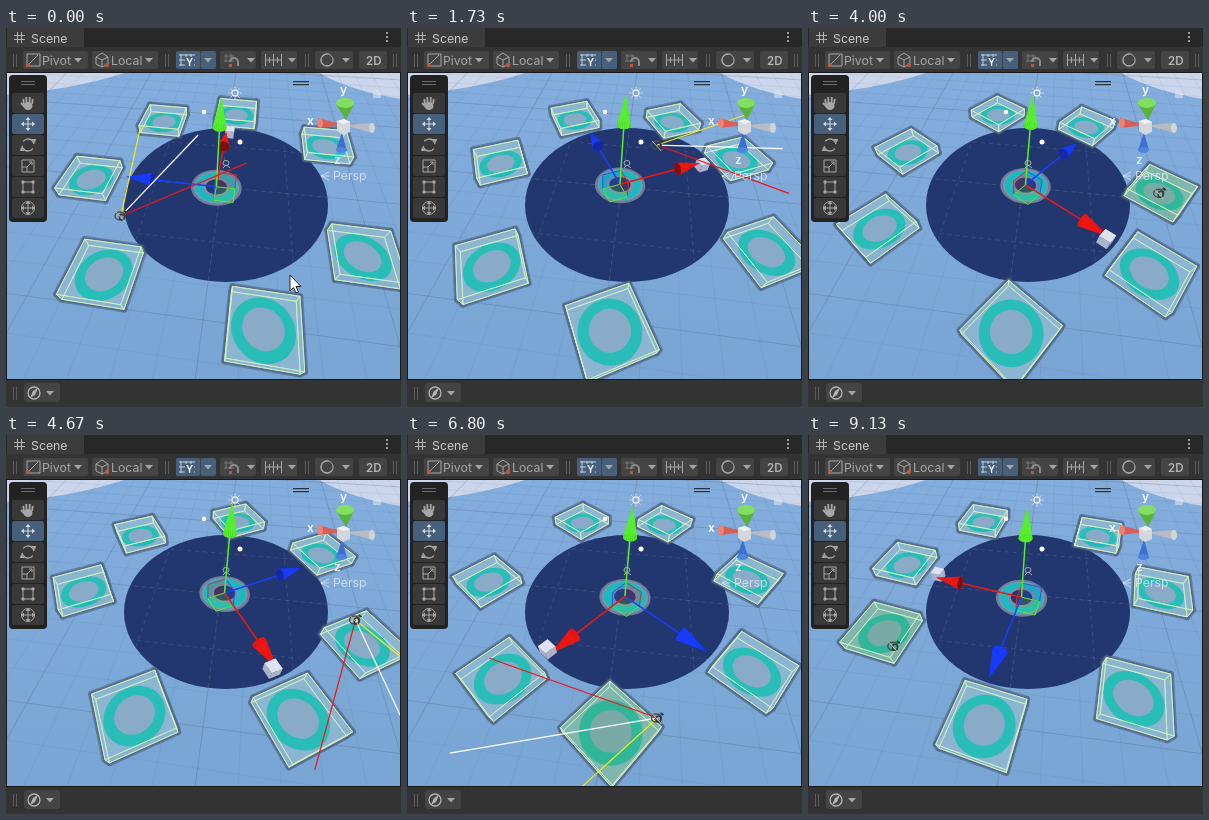
Write an HTML page with a canvas that moves like this. It is 395x379 px and loops after 9190 ms.

```html
<!DOCTYPE html>
<html lang="en">
<head>
<meta charset="utf-8">
<title>Scene view</title>
<style>
html, body { margin: 0; width: 100%; height: 100%; overflow: hidden; background: #282828; }
canvas { display: block; width: 395px; height: 379px; }
</style>
</head>
<body>
<canvas id="view" width="395" height="379"></canvas>
<script>
const g = document.getElementById('view').getContext('2d');
const LOOP = 9190, RAD = Math.PI / 180, TAU = Math.PI * 2;
const INK = '#a6a6a6';

// time, board heading, walker angle on the board, walker radius, facing on the board
const KEYS = [
  [0, 171, 30.7, .378, -110],
  [1730, 110.5, -53, .307, -113],
  [4000, 47.5, -51, .509, -113],
  [5600, -8.5, -23, .449, -113.5],
  [6800, -44.5, -36, .478, -126],
  [7930, -97, -35, .457, -121],
  [9130, -108, -43, .489, -121]
];
// angle and distance from the hub
const TILES = [[4, .503], [-51, .507], [-92, .508], [-143, .526], [-206, .523], [-251, .525], [-306, .509]];

function pose(t) {
  let i = 0;
  while (i < KEYS.length - 2 && t > KEYS[i + 1][0]) i++;
  const a = KEYS[i], b = KEYS[i + 1];
  const u = Math.min(1, (t - a[0]) / (b[0] - a[0]));
  const [, heading, angle, radius, facing] = a.map((v, n) => v + (b[n] - v) * u);
  return { heading, angle, radius, facing };
}

// World: x right, y up, z away from the viewer
const toCamera = ([x, y, z]) => [x + .065, .145 + .8 * z + .6 * y, 1 + .6 * z - .8 * y];
function project(point) {
  const [x, y, depth] = toCamera(point);
  return [197.5 + 264 * x / depth, 197.5 - 264 * y / depth];
}
const polar = (r, deg, y = 0) => [r * Math.cos(deg * RAD), y, r * Math.sin(deg * RAD)];
const add = (a, b, k = 1) => a.map((v, i) => v + b[i] * k);

function trace(points, closed = true) {
  g.beginPath();
  points.forEach(([x, y], i) => i ? g.lineTo(x, y) : g.moveTo(x, y));
  if (closed) g.closePath();
}
function fill(points, color) { trace(points); g.fillStyle = color; g.fill(); }
function line(points, color, width = 1, closed = false) {
  trace(points, closed);
  g.strokeStyle = color; g.lineWidth = width; g.stroke();
}
function rect(x, y, w, h, color, r = 0) {
  g.beginPath(); g.roundRect(x, y, w, h, r); g.fillStyle = color; g.fill();
}
function oval(x, y, rx, ry, color, width) {
  g.beginPath(); g.ellipse(x, y, rx, ry, 0, 0, TAU);
  if (width) { g.strokeStyle = color; g.lineWidth = width; g.stroke(); }
  else { g.fillStyle = color; g.fill(); }
}
function text(s, x, y, size = 12.3, color = INK, weight = 400) {
  g.font = `${weight} ${size}px Inter, Roboto, sans-serif`;
  g.fillStyle = color; g.fillText(s, x, y);
}
function circle(center, r) {
  return Array.from({ length: 40 }, (_, i) => project(add(center, polar(r, i * 9))));
}

function drawGround() {
  const sky = g.createLinearGradient(0, 45, 0, 350);
  sky.addColorStop(0, '#83addd');
  sky.addColorStop(1, '#78a5d3');
  g.fillStyle = sky; g.fillRect(0, 44, 395, 308);
  g.fillStyle = '#cbd6ec';
  g.beginPath(); g.moveTo(0, 45); g.lineTo(118, 45); g.quadraticCurveTo(70, 61, 0, 67); g.fill();
  g.beginPath(); g.moveTo(313, 45); g.lineTo(395, 45); g.lineTo(395, 71); g.quadraticCurveTo(345, 63, 313, 45); g.fill();
  oval(220, 177, 102, 77, '#22376f');
  for (let i = -12; i <= 12; i++) {
    const color = i % 5 ? 'rgba(50,75,120,.08)' : 'rgba(75,80,100,.24)';
    for (const turn of [-7.6, 82.4]) {
      const side = polar(i * .1, turn + 90);
      line([-1.2, 1.2].map(k => project(add(side, polar(1, turn), k))), color);
    }
  }
  g.save();
  g.beginPath(); g.ellipse(220, 177, 102, 77, 0, 0, TAU); g.clip();
  g.setLineDash([4, 4]);
  for (const k of [-.25, 0, .25])
    for (const turn of [-7.6, 82.4])
      line([-.5, .5].map(n => project(add(polar(k, turn + 90), polar(1, turn), n))), 'rgba(150,165,180,.2)');
  g.restore();
}

function drawTile(center, heading, active) {
  const level = y => [45, 135, 225, 315].map(a => project(add(center, polar(.129, heading + a, y))));
  const low = level(-.008), high = level(.028);
  const faces = [low, high, ...low.map((p, i) => [p, low[(i + 1) % 4], high[(i + 1) % 4], high[i]])];
  g.lineJoin = 'round';
  faces.forEach(f => line(f, 'rgba(65,85,120,.3)', 6.5, true));
  faces.forEach(f => line(f, '#576a88', 3.5, true));
  faces.forEach(f => fill(f, active ? '#7cb3ab' : '#88b2d0'));
  fill(circle(center, .084), active ? '#27b597' : '#1fbcb6');
  fill(circle(center, .055), active ? '#76a7a2' : '#86a8c8');
  fill(high, 'rgba(190,220,205,.06)');
  faces.forEach(f => line(f, 'rgba(207,242,193,.8)', 1, true));
}

function drawHub(o) {
  fill(circle(o, .096), '#6d7d9b');
  fill(circle(o, .086), '#8295ad');
  fill(circle(o, .08), '#19b9c0');
  fill(circle(o, .052), '#7d8fa9');
  fill(circle(o, .04), '#25366b');
}

function drawArrow(o, dir, color, dark) {
  const upright = dir[1] > .5;
  const from = add(o, dir, .25), tip = project(add(o, dir, upright ? .345 : .355));
  const across = upright ? [1, 0, 0] : [-dir[2], 0, dir[0]];
  const other = upright ? [0, 0, 1] : [0, 1, 0];
  const r = upright ? .021 : .025;
  const base = Array.from({ length: 20 }, (_, i) => project(
    add(add(from, across, r * Math.cos(i * TAU / 20)), other, r * Math.sin(i * TAU / 20))));
  line([project(o), project(from)], color, 1.5);
  // the base shows when the axis runs along the line of sight
  const sight = toCamera(from);
  const axis = [dir[0], .8 * dir[2] + .6 * dir[1], .6 * dir[2] - .8 * dir[1]];
  const away = axis.reduce((sum, v, i) => sum + v * sight[i], 0) > 0;
  if (!away) fill(base, dark);
  base.forEach((p, i) => fill([tip, p, base[(i + 1) % 20]], color));
  if (away) fill(base, dark);
}

function drawHandles(o, heading) {
  const red = polar(1, heading - 90), blue = polar(1, heading), up = [0, 1, 0];
  const near = v => v[2] > 0 ? v.map(n => -n) : v;
  const square = (a, b, color) => {
    const pts = [o, add(o, a, .07), add(add(o, a, .07), b, .07), add(o, b, .07)].map(project);
    fill(pts, color + '30'); line(pts, color, 1, true);
  };
  square(up, near(red), '#275bd8');
  square(up, near(blue), '#b63848');
  square(near(red), near(blue), '#62e33e');

  const cube = polar(.353, heading - 90);
  const cubeFace = y => [45, 135, 225, 315].map(a => project(add(cube, polar(.027, heading + a, y))));
  const bottom = cubeFace(-.015), top = cubeFace(.022);
  const arrows = [[red, '#ef1712', '#7c0f14'], [blue, '#1a3cff', '#1728a5'], [up, '#56ee2d', '#35a61d']];
  const drawCube = () => {
    bottom.forEach((p, i) => fill([p, bottom[(i + 1) % 4], top[(i + 1) % 4], top[i]], '#aab3ca'));
    fill(top, '#dfe3f0');
  };
  if (red[2] > 0) drawCube();
  arrows.sort((a, b) => b[0][2] - a[0][2]).forEach(a => drawArrow(o, ...a));
  if (red[2] <= 0) drawCube();
}

function drawWalker(spot, facing, rays) {
  const [x, y] = project(spot);
  if (rays) {
    const fan = [[30, '#f7e81c'], [0, '#ffffff'], [-30, '#f01515']];
    fan.forEach(([a, c]) => line([[x, y], project(add(spot, polar(.54, facing + a)))], c, 1.2));
  }
  oval(x - 1, y, 5, 4, '#4b5054', 1.5);
  oval(x + 1, y + 1, 2.5, 3, '#34393c', 1.5);
  line([[x - 5, y - 4], [x + 4, y + 6]], '#c5b8a8');
  line([[x + 3, y - 5], [x + 6, y - 3]], '#333', 2);
}

function drawMarkers() {
  oval(229, 65, 3, 3, '#eee', 1.3);
  for (let i = 0; i < 8; i++) {
    const c = Math.cos(i * TAU / 8), s = Math.sin(i * TAU / 8);
    line([[229 + 4.5 * c, 65 + 4.5 * s], [229 + 6.5 * c, 65 + 6.5 * s]], '#ddd');
  }
  oval(198, 84, 2.2, 2.2, '#fff');
  oval(234, 114, 2.5, 2.5, '#fff');
  oval(220, 135, 3, 2.5, '#a9aaa7', 1);
  line([[217, 140], [220, 137], [224, 140]], '#a9aaa7');
}

function drawCompass() {
  const cone = (pts, color, cx, cy, rx, ry, cap) => { fill(pts, color); oval(cx, cy, rx, ry, cap); };
  cone([[338, 97], [367, 95], [367, 105]], '#b8bcc2', 366, 100, 3, 5, '#d2d5d8');
  cone([[338, 97], [312, 90], [313, 100]], '#d65f57', 314, 95, 3, 5, '#ed827a');
  cone([[336, 104], [330, 123], [341, 123]], '#3b70cf', 335.5, 122, 5.5, 3, '#4d84e0');
  fill([[331, 93], [338, 91], [344, 94], [344, 104], [337, 107], [331, 103]], '#d4d7dc');
  fill([[331, 93], [338, 91], [344, 94], [337, 96]], '#f0f1f2');
  cone([[330, 76], [348, 76], [340, 92]], '#59b23b', 339, 75, 9, 5, '#83df61');
  text('y', 334, 66, 12, '#f4f6f8', 600);
  text('x', 301, 97, 12, '#f4f6f8', 600);
  text('z', 328, 136, 12, '#e4eaf2', 600);
  text('Persp', 327, 152, 12.3, 'rgba(225,232,240,.8)');
  for (const y of [144, 148, 152]) line([[315, 148], [323, y]], 'rgba(225,232,240,.8)');
  const faint = 'rgba(225,235,245,.55)';
  rect(367, 65, 8, 5, faint, 1);
  g.beginPath(); g.arc(370, 65, 2.5, Math.PI, TAU); g.strokeStyle = faint; g.lineWidth = 1; g.stroke();
  rect(287, 53, 16, 1.2, '#2b2f36'); rect(287, 56, 16, 1.2, '#2b2f36');
}

function caret(x, y) { fill([[x - 4, y - 2], [x + 4, y - 2], [x, y + 2.5]], INK); }
function grip(x, y) { rect(x, y - 6, 1, 13, '#5c5c5c'); rect(x + 3, y - 6, 1, 13, '#5c5c5c'); }

function drawBars() {
  rect(0, 0, 395, 20, '#282828'); rect(1, 0, 77, 20, '#3c3c3c');
  rect(0, 19, 395, 26, '#333'); rect(0, 351, 395, 28, '#333');
  rect(0, 44, 395, 1, '#191919'); rect(0, 351, 395, 1, '#191919');
  rect(0, 44, 1, 308, '#191919'); rect(394, 44, 1, 308, '#191919');
  for (const k of [11.5, 15.5]) {
    line([[k, 4], [k, 15]], '#b4b4b4'); line([[8, k - 4], [19, k - 4]], '#b4b4b4');
  }
  text('Scene', 25, 15, 12.3, '#c8c8c8');
  for (const y of [5, 9, 13]) oval(381, y, 1.1, 1.1, '#bbb');

  [[17, 65], [86, 66], [170, 40], [214, 36], [255, 36], [309, 38], [353, 28]]
    .forEach(([x, w]) => rect(x, 23, w, 18, '#444', 2));
  [7, 159, 299].forEach(x => grip(x, 32));
  rect(170, 23, 24, 18, '#46607c', 2); rect(195, 23, 15, 18, '#46607c', 2);
  [72, 143, 202, 245, 286, 340].forEach(x => caret(x, 32));
  line([[21, 39], [21, 26], [34, 26], [34, 38], [21, 38], [32, 27]], INK);
  oval(22, 37, 2, 2, '#b9573f');
  text('Pivot', 36, 37); text('Local', 105, 37);
  line([[90, 29], [96, 25], [102, 29], [102, 36], [96, 39], [90, 36], [90, 29], [96, 32], [102, 29]], INK);
  line([[96, 32], [96, 39]], INK); oval(101, 37, 2.2, 2.2, '#b9573f');
  for (const k of [0, 5, 10]) {
    line([[175 + k, 26], [175 + k, 38]], '#c7d0da'); line([[173, 27 + k], [189, 27 + k]], '#c7d0da');
  }
  rect(179, 29, 9, 10, '#46607c'); text('Y', 180, 38, 10, '#fff', 600);
  for (const k of [0, 5]) {
    line([[220 + k, 26], [220 + k, 34]], '#777'); line([[218, 28 + k], [228, 28 + k]], '#777');
  }
  g.beginPath(); g.arc(228, 34, 4, Math.PI, TAU); g.lineTo(232, 38);
  g.strokeStyle = '#8c8c8c'; g.lineWidth = 2; g.stroke(); rect(223, 36, 3, 3, '#b9573f');
  for (let i = 0; i < 5; i++) line([[259.5 + i * 4, i % 2 ? 29 : 26], [259.5 + i * 4, i % 2 ? 35 : 38]], INK);
  line([[260, 32], [276, 32]], INK);
  oval(321, 32, 6, 6, INK, 1.3); oval(323, 31, 4.5, 5, '#444'); oval(321, 32, 6, 6, INK, 1);
  text('2D', 360, 37, 11.5, '#b4b4b4', 600);
  grip(387, 32);
  grip(7, 365); rect(18, 355, 36, 19, '#444', 3); caret(44, 365);
  oval(28, 365, 6, 6, '#b4b4b4', 1.3); fill([[32, 360], [29, 367], [24, 370], [27, 363]], '#b4b4b4');
}

function drawTools() {
  rect(3, 47, 38, 147, '#222', 4);
  rect(15, 53, 14, 1, '#6a6a6a'); rect(15, 56, 14, 1, '#6a6a6a');
  for (let i = 0; i < 6; i++) rect(6, 65 + i * 21, 32, 20, i === 1 ? '#46607c' : '#393939', 2);
  const cx = 22;
  [-4, -1.5, 1.5, 4].forEach((k, i) => line([[cx + k, 76], [cx + k * 1.2, i % 3 ? 69 : 71]], INK, 1.8));
  oval(cx, 78, 4.5, 4, INK); line([[cx - 3, 79], [cx - 7, 75]], INK, 2);
  const cross = (y, r, color) => {
    line([[cx - r, y], [cx + r, y]], color); line([[cx, y - r], [cx, y + r]], color);
    [[1, 0], [-1, 0], [0, 1], [0, -1]].forEach(([a, b]) => fill([
      [cx + a * (r + 1), y + b * (r + 1)],
      [cx + a * (r - 2) + b * 2.5, y + b * (r - 2) + a * 2.5],
      [cx + a * (r - 2) - b * 2.5, y + b * (r - 2) - a * 2.5]], color));
  };
  cross(96, 6, '#d5dbe2');
  for (const a of [.2, 1.2]) {
    g.beginPath(); g.arc(cx, 117, 6, a * Math.PI, (a + .75) * Math.PI);
    g.strokeStyle = INK; g.lineWidth = 1.3; g.stroke();
  }
  fill([[25, 111], [30, 111], [29, 115]], INK); fill([[19, 123], [14, 123], [15, 119]], INK);
  line([[16, 132], [28, 132], [28, 144], [16, 144]], INK, 1, true);
  line([[16, 139], [21, 139], [21, 144]], INK); line([[21, 139], [26, 134]], INK); line([[23, 134], [26, 134], [26, 137]], INK);
  const corners = [[17, 154], [27, 154], [27, 164], [17, 164]];
  line(corners, INK, 1, true);
  corners.forEach(([x, y]) => oval(x, y, 1.7, 1.7, INK));
  oval(cx, 180, 6.5, 6.5, INK, 1); cross(180, 6, INK);
}

function drawCursor(t) {
  if (t > 900) return;
  const u = (t / 900) ** 2, x = 284 + 30 * u, y = 247 + 140 * u;
  const shape = [[0, 0], [0, 16], [3.5, 12.5], [6, 18], [8.5, 17], [6, 11.5], [11, 11.5]].map(([a, b]) => [x + a, y + b]);
  fill(shape, '#fff'); line(shape, '#222', 1, true);
}

function draw(t) {
  const { heading, angle, radius, facing } = pose(t);
  const resting = (t > 3500 && t < 4600) || t > 8550;
  const active = resting || (t > 6550 && t < 7300);
  const hub = polar(.0165, heading);

  g.save();
  g.beginPath(); g.rect(0, 45, 395, 306); g.clip();
  drawGround();
  drawHub(hub);
  TILES.map(([a, r], i) => ({ at: polar(r, heading + a), lit: active && i === 1 }))
    .sort((a, b) => b.at[2] - a.at[2])
    .forEach(tile => drawTile(tile.at, heading, tile.lit));
  drawMarkers();
  drawHandles(hub, heading);
  drawWalker(polar(radius, heading + angle), heading + facing, !resting);
  drawCompass();
  g.restore();
  drawBars();
  drawTools();
  drawCursor(t);
}

const start = performance.now();
function tick() {
  const t = (performance.now() - start) % LOOP;
  let step = Math.floor((t + 3.4) * .015);
  if (Math.round(step * 20 / 3) * 10 > t) step--;
  draw(Math.max(0, step) * 200 / 3);
  requestAnimationFrame(tick);
}
tick();
</script>
</body>
</html>
```
